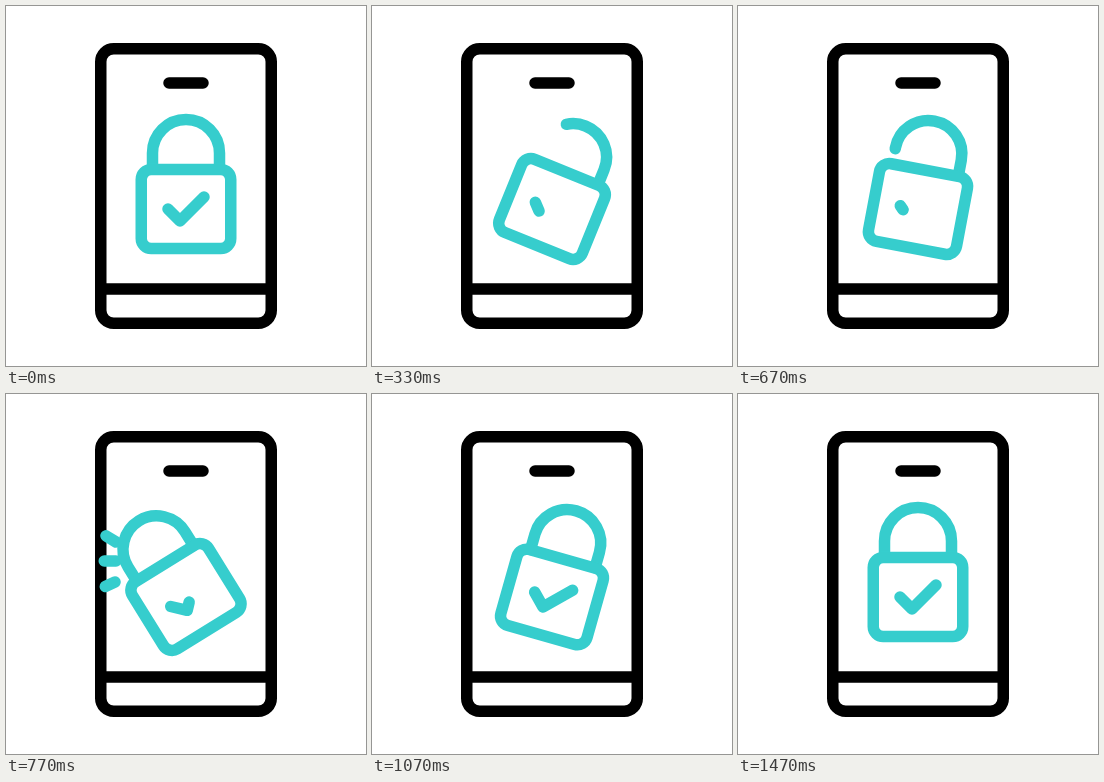
Recreate the animation shown at these times as an HTML page. Size 360x360 px, loop 1.67 s.

```html
<!DOCTYPE html>
<html lang="en">
<head>
<meta charset="utf-8">
<title>Phone lock</title>
<style>
  html, body { margin: 0; height: 100%; overflow: hidden; background: #fff; }
  svg { display: block; width: 100vw; height: 100vh; fill: none; stroke-width: 11.5; stroke-linecap: round; stroke-linejoin: round; }
</style>
</head>
<body>
<svg viewBox="0 0 360 360">
  <g stroke="#000">
    <rect x="94.75" y="42.75" width="170.5" height="274.5" rx="13"/>
    <path d="M95 283H265M163 77H197"/>
  </g>
  <g stroke="#36cdcd">
    <path class="spark" pathLength="1" d="M110 148L81 130"/>
    <path class="spark" pathLength="1" d="M110 167H76"/>
    <path class="spark" pathLength="1" d="M109 188L81 201"/>
    <g id="lock">
      <path id="shackle" pathLength="1" d="M213.5 163V147A33.5 33.5 0 0 0 146.5 147V163"/>
      <rect x="135.25" y="163.5" width="89.5" height="79" rx="10"/>
      <path id="check" pathLength="1" d="M162 203L174 215L198 191"/>
    </g>
  </g>
</svg>
<script>
const LOOP = 1670, FPS = 30, LAST = 44;
const $ = id => document.getElementById(id);
const sparks = document.querySelectorAll('.spark');

// Keys are [frame, value] pairs, joined with a sine ease.
const swing = [[2, 0], [17, 40], [24, -35.5], [31, 17], [38, -8], [44, 0]];
const shackleEnd = [[0, 1], [14, .56], [16, .56], [22, 1]];
const checkEnd = [[0, 1], [14, 0], [18, 0], [28, 1]];
const sparkEnd = [[21, 0], [26, 1]];
const sparkStart = [[24, 0], [29, 1]];

function at(keys, f) {
  const i = keys.findIndex(key => key[0] > f);
  if (i < 0) return keys[keys.length - 1][1];
  if (i === 0) return keys[0][1];
  const [f0, v0] = keys[i - 1], [f1, v1] = keys[i];
  return v0 + (v1 - v0) * (1 - Math.cos(Math.PI * (f - f0) / (f1 - f0))) / 2;
}

function trim(path, start, end) {
  path.style.visibility = end - start > .001 ? 'visible' : 'hidden';
  path.setAttribute('stroke-dasharray', `${end - start} 2`);
  path.setAttribute('stroke-dashoffset', -start);
}

function draw() {
  const t = performance.now() % LOOP;
  const f = Math.min(LAST, Math.floor((t + 3.4) * FPS / 1000));
  $('lock').setAttribute('transform', `rotate(${at(swing, f)} 180 203)`);
  trim($('shackle'), 0, at(shackleEnd, f));
  trim($('check'), 0, at(checkEnd, f));
  sparks.forEach(spark => trim(spark, at(sparkStart, f), at(sparkEnd, f)));
  requestAnimationFrame(draw);
}
draw();
</script>
</body>
</html>
```
